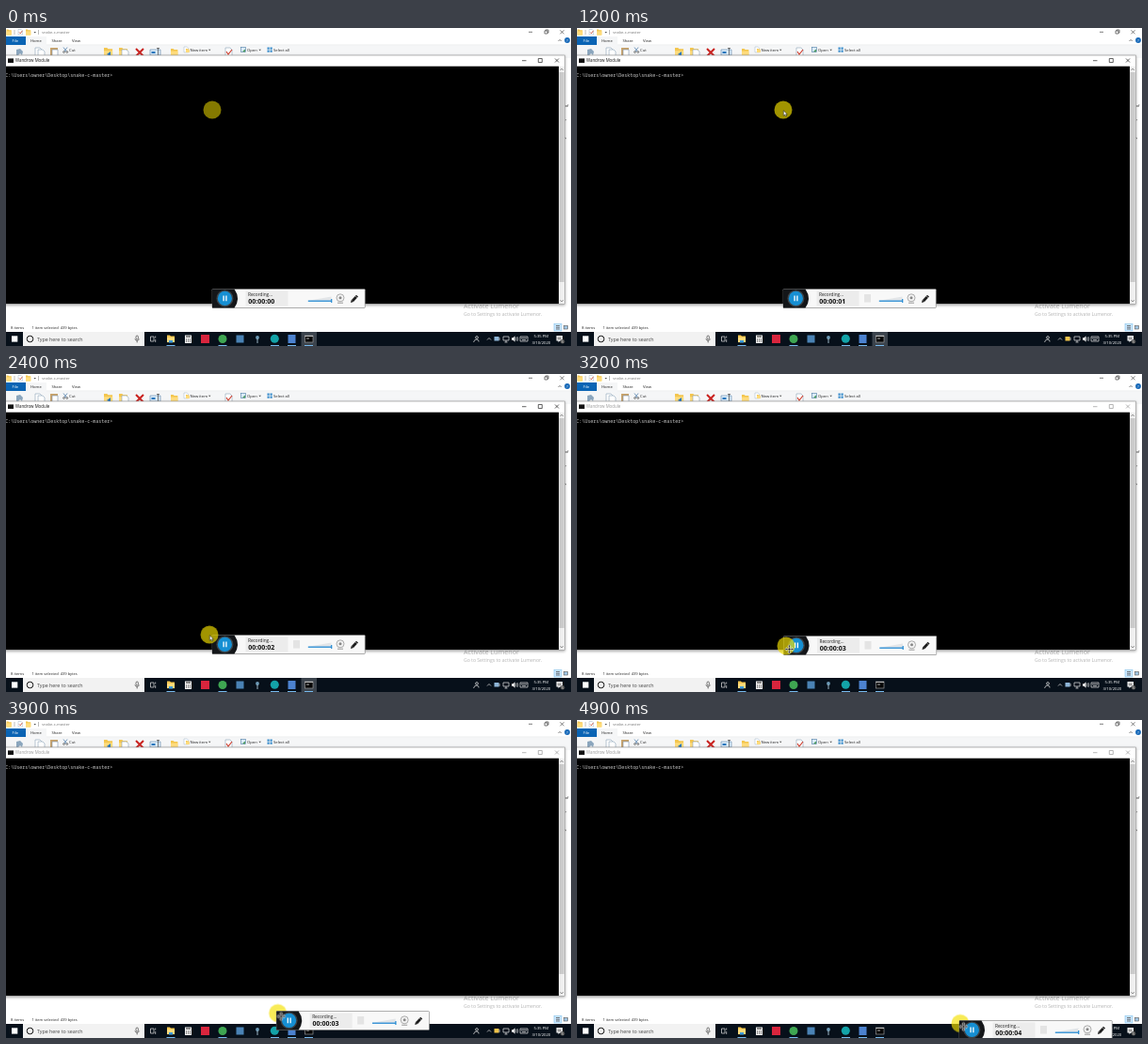
An HTML page for the animation above (5 s loop, 600x338 px).

```html
<!DOCTYPE html>
<html lang="en">
<head>
<meta charset="utf-8">
<title>Screen recording</title>
<style>
html, body { margin: 0; width: 100%; height: 100%; overflow: hidden; background: #fff; }
svg { display: block; width: 100vw; height: 100vh; }
text { font: 4.2px "Open Sans", "Noto Sans", sans-serif; fill: #222; white-space: pre; }
.mono { font: 5px "Noto Sans Mono", "DejaVu Sans Mono", monospace; fill: #ccc; }
.light { fill: #fff; }
.mark { fill: #b4b4b4; }
.line { fill: none; stroke: #444; stroke-width: .7; }
.tray { fill: none; stroke: #e4e4e4; stroke-width: .7; }

/* One shared five second clock */
.anim { animation: 5s linear infinite; }
.step { animation: 5s step-end infinite; }
.pointer { animation-name: point; }
.recorder { animation-name: drag; }
.caret { animation-name: caret; }
.focus { animation-name: focus; }
.title { animation-name: title; }
.glyphs { animation-name: glyphs; }
.battery { animation-name: battery; }
.halo { fill: #f5e100; animation-name: glow; }
.early { animation-name: early; }
.late { animation-name: late; }
.arrow { animation-name: arrow; }
.move { animation-name: move; }
.level { animation-name: level; }
.clock text { font-size: 7px; font-weight: 700; fill: #111; animation: second 5s step-end infinite; animation-delay: calc(var(--s) * 1s - 5s); }

@keyframes point {
  0%, 34% { transform: translate(219px, 87px); }
  40%, 42% { transform: translate(215px, 205px); }
  48% { transform: translate(216px, 277px); }
  54% { transform: translate(218px, 284px); }
  64%, 66% { transform: translate(222px, 289px); }
  78% { transform: translate(288.5px, 311.5px); }
  86% { transform: translate(363px, 321.5px); }
  90% { transform: translate(367px, 322px); }
  98%, 100% { transform: translate(407px, 322.5px); }
}
@keyframes drag {
  0%, 60% { transform: none; }
  64%, 66% { transform: translate(.5px, 1px); }
  78% { transform: translate(68px, 32px); }
  86% { transform: translate(140px, 40px); }
  90% { transform: translate(144px, 41px); }
  98%, 100% { transform: translate(187px, 42px); }
}
@keyframes caret {
  0%, 20%, 40% { visibility: hidden; }
  10%, 30% { visibility: visible; }
}
@keyframes focus { 0% { visibility: visible; } 56%, 100% { visibility: hidden; } }
@keyframes title { 0% { fill: #111; } 56%, 100% { fill: #999; } }
@keyframes glyphs { 0% { stroke: #222; } 56%, 100% { stroke: #999; } }
@keyframes battery { 0%, 30% { fill: #8fb6d8; } 14%, 70%, 100% { fill: #f3c54b; } }
@keyframes glow { 0% { opacity: .54; } 2%, 100% { opacity: .66; } }
@keyframes early { 0% { visibility: visible; } 66%, 100% { visibility: hidden; } }
@keyframes late { 0% { visibility: hidden; } 66%, 100% { visibility: visible; } }
@keyframes arrow { 0%, 56%, 100% { visibility: hidden; } 2% { visibility: visible; } }
@keyframes move { 0% { visibility: hidden; } 56%, 100% { visibility: visible; } }
@keyframes level { 0% { visibility: hidden; } 2%, 100% { visibility: visible; } }
@keyframes second { 0% { visibility: visible; } 20%, 100% { visibility: hidden; } }
</style>
</head>
<body>
<svg viewBox="0 0 600 338" preserveAspectRatio="none">
  <defs>
    <g id="folder"><path d="M0 0h2.5l1 1H7v7H0z" fill="#f3c64f"/><path d="M0 2.5h7V8H0z" fill="#ffdc7c"/></g>
    <path id="sheet" d="M0 0h5l2 2v7H0z" fill="#fff" stroke="#8aa2b8" stroke-width=".6"/>
    <path id="down" d="M0 0h2.4l-1.2 1.5z" fill="#444"/>
    <rect id="run" width="9" height="1" fill="#76b9ed"/>
    <filter id="shade" x="-5%" y="-5%" width="110%" height="110%">
      <feDropShadow dx="0" dy="1" stdDeviation="1.6" flood-opacity=".35"/>
    </filter>
  </defs>

  <!-- File browser -->
  <rect width="600" height="338" fill="#fff"/>
  <rect y="18" width="600" height="14" fill="#f5f6f7"/>
  <path d="M0 17.8H21M43 17.8H600" stroke="#e3e4e6" stroke-width=".5"/>
  <use href="#folder" transform="translate(.5 1.5) scale(.75)"/>
  <path class="line" d="M9 2v5M34.5 2v5" stroke-opacity=".5"/>
  <use href="#sheet" transform="translate(13 1.5) scale(.65)"/>
  <path d="M14 4.5l1.3 1.4 2-3" fill="none" stroke="#c5442f" stroke-width=".8"/>
  <use href="#folder" transform="translate(21 1.5) scale(.75)"/>
  <use href="#down" x="29.5" y="4"/>
  <text x="38" y="6" style="fill:#777">snake-c-master</text>
  <path class="line" d="M555 4.3h4M572 3h3v3h-3zM573 3v-1h3v3h-1M588.5 2.3l4 4m0-4l-4 4"/>
  <rect y="9" width="21" height="9" fill="#0a64b4"/>
  <rect x="21" y="9" width="22" height="9.3" fill="#f5f6f7"/>
  <text x="6.5" y="15" class="light">File</text>
  <text x="26" y="15">Home</text>
  <text x="48.5" y="15">Share</text>
  <text x="70" y="15">View</text>
  <path class="line" d="M586.5 14l1.6-1.6 1.6 1.6"/>
  <circle cx="596" cy="13" r="2.9" fill="#1668b8"/>
  <text x="595" y="14.6" class="light">?</text>

  <!-- Ribbon -->
  <path d="M11 23l4-1 3 3-1 4-2-2-4 4z" fill="#8ba6bd"/>
  <use href="#sheet" x="31" y="21"/><use href="#sheet" x="34" y="23"/>
  <path d="M47 21h8v10h-8z" fill="#c9a36a"/><path d="M49 23h6v8h-6z" fill="#fff" stroke="#7a93ad" stroke-width=".6"/>
  <path class="line" d="M61 20.5l3.2 4.5M65 20.5l-3 4.5" style="stroke:#4577a8"/>
  <circle cx="61.5" cy="25.5" r=".9" class="line"/><circle cx="64.8" cy="25.5" r=".9" class="line"/>
  <text x="67" y="25.3">Cut</text>
  <use href="#folder" transform="translate(104 21) scale(1.3)"/>
  <path d="M107 28l4-3v5z" fill="#2676bd"/>
  <use href="#folder" transform="translate(120 21) scale(1.3)"/>
  <use href="#sheet" x="123" y="23"/>
  <path d="M138 22l8 8m0-8l-8 8" stroke="#c9211e" stroke-width="2"/>
  <path d="M153 23h11v6h-11z" fill="#dcecf9" stroke="#5f87ad" stroke-width=".6"/>
  <path class="line" d="M160 21.5h3M161.5 21.5v8"/><path d="M154.5 25h4v2h-4z" fill="#2676bd"/>
  <use href="#folder" transform="translate(175 22) scale(1.05)"/>
  <use href="#sheet" transform="translate(189 20) scale(.65)"/>
  <use href="#folder" transform="translate(191 22) scale(.5)"/>
  <text x="195.5" y="25.3">New item</text><use href="#down" x="215" y="22.7"/>
  <use href="#sheet" x="233" y="21"/>
  <path d="M234 25l2 3 4-5" fill="none" stroke="#cf3b2b" stroke-width="1.1"/>
  <rect x="249.5" y="20.5" width="4.8" height="5" fill="#dcecf9" stroke="#4d7ca6" stroke-width=".6"/>
  <path d="M251 25l3-2.5v3z" fill="#4c9c5d"/>
  <text x="256" y="25.3">Open</text><use href="#down" x="268.5" y="22.7"/>
  <path d="M277.5 20.5h2.2v2.2h-2.2zm3 0h2.2v2.2h-2.2zm-3 3h2.2v2.2h-2.2zm3 0h2.2v2.2h-2.2z" fill="#3a8dcc"/>
  <text x="284" y="25.3">Select all</text>

  <text x="593.5" y="84">of</text><text x="593" y="99">&gt;</text><text x="593" y="118">s</text>
  <text x="5" y="320.4">8 items</text>
  <text x="27.5" y="320.4" style="font-size:4px">1 item selected  439 bytes</text>
  <rect x="582" y="314.5" width="8" height="7.5" fill="#cce8ff" stroke="#70b8e8" stroke-width=".5"/>
  <path class="line" d="M584 316.5h4M584 318.3h4M584 320h4"/>
  <rect x="592.5" y="316.5" width="4" height="3.5" fill="#9fc5e4" stroke="#555" stroke-width=".6"/>
  <text x="486" y="298.3" class="mark" style="font-size:7.2px">Activate Lumenor</text>
  <text x="486" y="306.2" class="mark" style="font-size:5.1px">Go to Settings to activate Lumenor.</text>

  <!-- Console -->
  <rect x="-2" y="29" width="595.5" height="264.5" fill="#fff" stroke="#888" stroke-width=".6" filter="url(#shade)"/>
  <rect x="2" y="32" width="6" height="5" fill="#111"/>
  <path d="M2 32.4h6" stroke="#aaa" stroke-width=".7"/>
  <text x="10" y="36.2" class="step title" style="font-size:4.4px">Wandrow Module</text>
  <path class="line step glyphs" d="M548 34.7h4.5M565.3 32.5h4v4h-4zM583 32.5l4 4m0-4l-4 4"/>
  <rect y="40.7" width="587" height="252.3" fill="#000"/>
  <rect x="587" y="40.7" width="6" height="252.3" fill="#f0f0f0"/>
  <rect x="587.3" y="47" width="5.4" height="223" fill="#cbcbcb"/>
  <path class="line" d="M588.6 44.8l1.5-1.5 1.5 1.5M588.6 289.3l1.5 1.5 1.5-1.5"/>
  <text x="-.7" y="51.6" class="mono">C:\Users\owner\Desktop\snake-c-master&gt;</text>
  <rect class="step caret" x="113.5" y="51.4" width="3" height="1" fill="#ccc"/>

  <!-- Taskbar -->
  <rect y="323" width="600" height="15" fill="#07101a"/>
  <rect x="6" y="327.3" width="6.3" height="6.3" fill="#fff"/>
  <rect x="18" y="323" width="129" height="15" fill="#f2f2f2"/>
  <circle cx="25.5" cy="330.5" r="3.3" fill="none" stroke="#111"/>
  <text x="33" y="332.6" style="font-size:5.3px;fill:#444">Type here to search</text>
  <rect x="138" y="327" width="2.4" height="4.2" rx="1.2" class="line"/>
  <path class="line" d="M136.8 330.5q2.4 4 4.8 0M139.2 332.5v2"/>
  <path class="tray" d="M153.5 328h3.5v5h-3.5zM158.7 327.5v2M158.7 331v3"/>
  <use href="#folder" transform="translate(171 326.5) scale(1.15 .95)"/>
  <path d="M173 332h4v2.5h-4z" fill="#3c9bdc"/>
  <rect x="190" y="326.5" width="7" height="8.5" fill="#f4f4f4"/>
  <path d="M191 328h5M191 331h1m1 0h1m1 0h1M191 333h1m1 0h1m1 0h1" stroke="#222" stroke-width="1"/>
  <rect x="207" y="326" width="9" height="9" fill="#d9253d"/>
  <circle cx="230" cy="330.5" r="4.5" fill="#3fa652"/>
  <rect x="244.5" y="326.5" width="8" height="8" fill="#4a83b5"/>
  <circle cx="267" cy="329" r="1.9" fill="#6d9bb8"/><path d="M267 330v5" stroke="#9db5c4"/>
  <circle cx="285.3" cy="330.3" r="4.5" fill="#13a3a8"/>
  <rect x="299.5" y="326" width="8" height="9" fill="#4c82cf"/>
  <rect class="step focus" x="313.5" y="323" width="16.5" height="15" fill="#3b434c"/>
  <rect x="317.5" y="327" width="8.5" height="7" fill="#050505" stroke="#aaa" stroke-width=".6"/>
  <path d="M317.5 327.5h8.5M319 330h3" stroke="#ddd" stroke-width=".8"/>
  <use href="#run" x="170.5" y="337"/><use href="#run" x="225.5" y="337"/><use href="#run" x="281" y="337"/>
  <use href="#run" x="299" y="337"/><use href="#run" x="317" y="337"/>

  <!-- Tray -->
  <circle cx="500" cy="329" r="1.4" class="tray"/><path class="tray" d="M496.5 334q1-3.5 3.5-3t2 2.5"/>
  <path class="tray" d="M511 331.5l2-2 2 2"/>
  <rect class="step battery" x="518.5" y="328" width="5" height="4.5"/><path class="tray" d="M524 329v3"/>
  <path class="tray" d="M528 328h6v4h-6zM531 332v2M529.5 334h3"/>
  <path d="M537 329.3h1.5l2-2v6.5l-2-2H537z" fill="#eee"/><path class="tray" d="M541.6 329q1 1.5 0 3M542.8 328q1.8 2.5 0 5"/>
  <path class="tray" d="M546 328h8v5h-8zM547 329.8h6M548 331.6h4"/>
  <text x="568.3" y="328.8" text-anchor="middle" class="light">5:35 PM</text>
  <text x="568.3" y="336.2" text-anchor="middle" class="light">3/10/2020</text>
  <path d="M584.5 327h6.5v5.5h-3l-1.5 1.8v-1.8h-2z" fill="#f2f2f2"/>
  <path class="line" d="M585.7 329h4M585.7 330.6h4"/>
  <circle cx="591" cy="333.3" r="2.3" fill="#555"/>
  <text x="590" y="334.6" class="light" style="font-size:3.4px">5</text>

  <g class="anim pointer"><g class="step late"><circle class="step halo" r="9.5"/></g></g>

  <!-- Recorder -->
  <g class="anim recorder">
    <rect x="219" y="277.5" width="162.3" height="20" rx=".8" fill="#f8f8f8" stroke="#777" stroke-width=".6"/>
    <path d="M219 277.5h23.5q7 10 0 20H219z" fill="#141619"/>
    <circle cx="232.4" cy="287.4" r="9" fill="#3b4146"/>
    <circle cx="232.4" cy="287.4" r="7.6" fill="#168fd3"/>
    <path d="M231.1 284.6v5.6M233.9 284.6v5.6" stroke="#fff" stroke-width="1.3"/>
    <rect x="254.5" y="279.5" width="45" height="16" fill="#ececec"/>
    <text x="257" y="284.7" style="font-size:4.75px">Recording...</text>
    <g class="clock">
      <text x="257.3" y="293.4" style="--s:0">00:00:00</text>
      <text x="257.3" y="293.4" style="--s:1">00:00:01</text>
      <text x="257.3" y="293.4" style="--s:2">00:00:02</text>
      <text x="257.3" y="293.4" style="--s:3">00:00:03</text>
      <text x="257.3" y="293.4" style="--s:4">00:00:04</text>
    </g>
    <rect class="step level" x="305" y="283" width="7" height="8.5" fill="#e4e4e4"/>
    <path d="M321 289.7l24.5-4.2v4.2z" fill="#e2e5e8"/>
    <path d="M320.8 290.2h25" stroke="#2389d2" stroke-width="1.3"/>
    <path d="M345.7 288v4" stroke="#2389d2" stroke-width="1.2"/>
    <circle cx="355" cy="286.8" r="4" fill="#f3f3f3" stroke="#999" stroke-width=".8"/>
    <circle cx="355" cy="286.8" r="1.5" fill="#888"/>
    <path d="M352 292.2h6" stroke="#999"/>
    <path d="M368 290l5-5.4" stroke="#1c1c1c" stroke-width="2.8"/>
    <path d="M366 292l.8-3.2 2.3 2.2z" fill="#1c1c1c"/>
    <path d="M371 285l2.2 2" stroke="#eee" stroke-width=".5"/>
  </g>

  <!-- Mouse -->
  <g class="anim pointer">
    <g class="step early"><circle class="step halo" r="9.5"/></g>
    <path class="step arrow" d="M.3 .8v5.4l1.3-1.2 1 2.1.9-.4-.9-2h1.7z" fill="#fff" stroke="#111" stroke-width=".5"/>
    <path class="step move" d="M3.5-1.2l1.6 1.8h-1v2.3h2.3v-1l1.8 1.6-1.8 1.6v-1H4.1v2.3h1L3.5 8.2 1.9 6.4h1V4.1H.6v1L-1.2 3.5.6 1.9v1h2.3V.6h-1z" fill="#111" stroke="#fff" stroke-width=".6"/>
  </g>
</svg>
</body>
</html>
```
